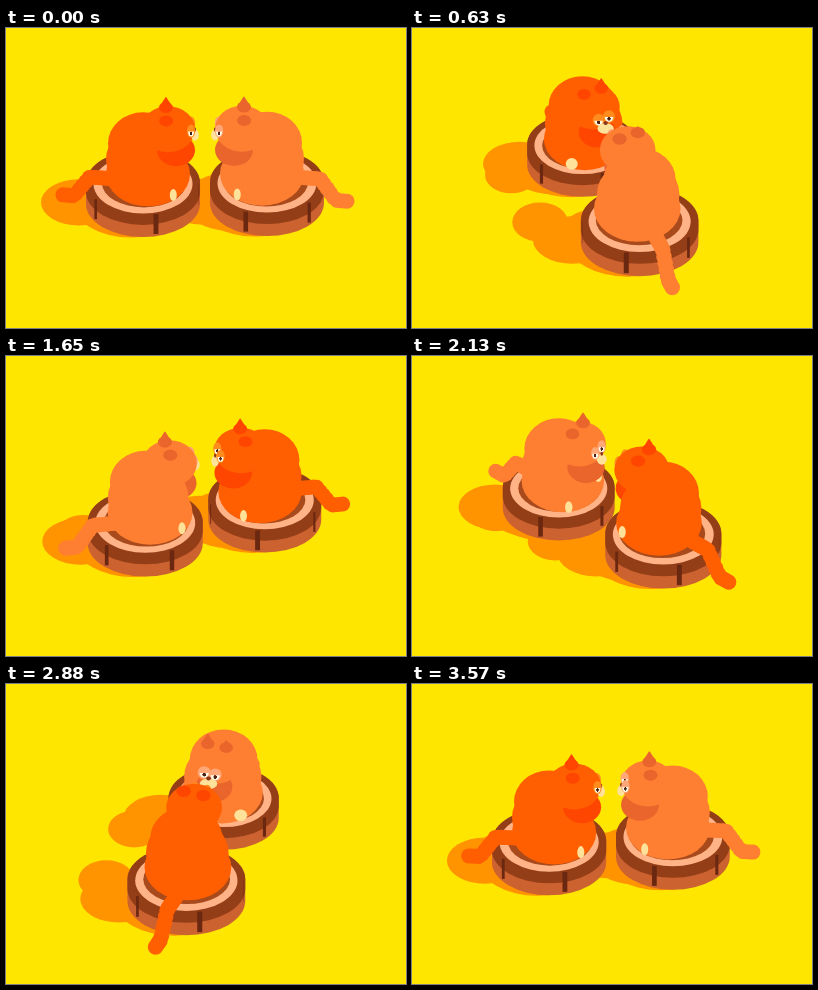
An HTML page without scripts that plays this animation: 400 px wide and 300 px high, repeating every 3.6 s.

```html
<!DOCTYPE html>
<html lang="en">
<head>
<meta charset="utf-8">
<title>Two cats circling on robot vacuums</title>
<style>
@property --turn { syntax: "<angle>"; inherits: true; initial-value: 0deg; }
@keyframes turn { to { --turn: 360deg; } }

html, body { margin: 0; width: 100%; height: 100%; overflow: hidden; background: #ffe600; }
.stage {
  position: relative; width: 400px; height: 300px; overflow: hidden;
  isolation: isolate; background: #ffe600;
  animation: turn 3.6s steps(120) infinite;
}

/* a is the direction the cat faces; c and n are its cosine and sine */
.spot { --c: cos(var(--a)); --n: sin(var(--a)); --k: .67; }
.orange { --a: calc(var(--turn) - .5deg); --fur: #ff5f00; --dark: #ff4600; --lid: #ff8c1c; }
.tan { --a: calc(var(--turn) + 179.5deg); --fur: #ff7f32; --dark: #e9652c; --lid: #ffa777; }

.cat, .shade {
  position: absolute; left: 199.3px; top: 158.5px; width: 0; height: 0;
  translate: calc(var(--c) * -62px) calc(var(--n) * -43px);
  scale: calc(1 - .035 * var(--n));
}
.shade { z-index: -1000; }
.cat { z-index: calc(-100 * var(--n)); }

/* f: forward, s: sideways, u: up, x: screen shift, d: nearness to the viewer */
.part {
  --f: 0; --s: 0; --u: 0; --x: 0;
  --d: (var(--f) * var(--n) - var(--s) * var(--c));
  position: absolute; width: calc(var(--w) * 1px); height: calc(var(--h) * 1px);
  border-radius: 50%; background: var(--fur);
  translate:
    calc(-50% + 1px * (var(--f) * var(--c) + var(--s) * var(--n) + var(--x)))
    calc(-50% + 1px * (var(--k) * var(--d) - var(--u)));
}
.l { --side: 1; }
.r { --side: -1; }

.shade .part { --u: -15; background: #ff9400; }
.shade .base { --w: 114; --h: 66; --x: -12; --u: -17; }
.shade .low { --w: 90; --h: 58; --f: 5; --x: -33; }
.shade .mid { --w: 76; --h: 46; --f: 1; --x: -65; }
.shade .top { --w: 54; --h: 38; --f: 25; --x: -85; --u: -12; }

.side { --w: 114; --h: 87; --u: -6; z-index: -900; border-radius: 57px / 33px; background: #cc6230; }
.band { --w: 114; --h: 75; z-index: -890; border-radius: 57px / 33px; background: #943e17; }
.plate { --w: 99; --h: 59; --u: 3.5; z-index: -880; background: #ffb386; }
.seat { --w: 84; --h: 48; --f: 1; --u: 4; z-index: -870; background: #a84a1c; }
.notch {
  position: absolute; width: 5px; height: 20px; z-index: -860; background: #6b2810;
  --p: calc(var(--a) + 5deg + 72deg * var(--i));
  translate:
    calc(-50% + 55.5px * cos(var(--p)))
    calc(-50% + 4.5px + 33px * sin(var(--p)));
  scale: max(0, sin(var(--p))) 1;
}

.tail i {
  --p: calc(var(--i) / 14);
  --w: 15; --h: 15; z-index: -1;
  --f: calc(-34 - 46 * var(--p));
  --s: calc(6 * var(--p));
  --u: clamp(-11, 9 - 60 * (var(--p) - .42), 9);
}

.low { --w: 84; --h: 64; --f: 5; --u: 13; z-index: 0; }
.trunk { --w: 80; --h: 70; --f: 3; --u: 28; z-index: 0; }
.mid { --w: 70; --h: 62; --f: 0; --u: 44; z-index: 0; }
.chin { --w: 38; --h: 32; --f: 33; --u: 37; z-index: calc(8 + var(--d)); background: var(--dark); }
.top { --w: 54; --h: 46; --f: 25; --u: 58; z-index: 60; }
.foot {
  --w: 14; --h: 12; --f: 30; --s: calc(28 * var(--side)); --u: 11;
  z-index: calc(8 + var(--d)); background: #ffe29a; scale: max(.5, var(--n)) 1;
}

.ear { --w: 14; --h: 11; --f: 23; --s: calc(10 * var(--side)); --u: 73; z-index: 80; background: var(--dark); }
.ear::before {
  content: ""; position: absolute; left: 0; bottom: 50%; width: 14px; height: 11px;
  background: var(--dark); clip-path: polygon(50% 0, 100% 100%, 0 100%);
  transform-origin: bottom;
  scale: 1 clamp(0, .6 + var(--side) * var(--c) + .5 * var(--n), 1);
}

.eye { z-index: calc(90 + 8 * var(--d)); scale: max(.6, var(--n)) 1; }
.eye { --w: 14; --h: 13; --f: 48; --s: calc(6 * var(--side)); --u: 60; background: var(--lid); }
.eye::before {
  content: ""; position: absolute; left: 2px; top: 7px; width: 10px; height: 5px;
  border-radius: 0 0 5px 5px; background: radial-gradient(circle at 50% 35%, #4a2014 1.7px, #fffbe8 2.1px);
}
.muzzle {
  --w: 19; --h: 11; --f: 52; --u: 52; background: #ffe29a;
  z-index: calc(90 + 8 * var(--d)); scale: max(.4, var(--n)) 1;
}
.muzzle::before {
  content: ""; position: absolute; left: 7px; top: -2px; width: 5px; height: 4px;
  border-radius: 40% 40% 50% 50%; background: #8a3517;
}
</style>
</head>
<body>
<div class="stage">
  <div class="spot orange">
    <div class="shade">
      <div class="part base"></div><div class="part low"></div>
      <div class="part mid"></div><div class="part top"></div>
    </div>
    <div class="cat">
      <div class="part side"></div><div class="part band"></div>
      <div class="part plate"></div><div class="part seat"></div>
      <i class="notch" style="--i:0"></i><i class="notch" style="--i:1"></i><i class="notch" style="--i:2"></i>
      <i class="notch" style="--i:3"></i><i class="notch" style="--i:4"></i>
      <div class="tail">
        <i class="part" style="--i:0"></i><i class="part" style="--i:1"></i><i class="part" style="--i:2"></i>
        <i class="part" style="--i:3"></i><i class="part" style="--i:4"></i><i class="part" style="--i:5"></i>
        <i class="part" style="--i:6"></i><i class="part" style="--i:7"></i><i class="part" style="--i:8"></i>
        <i class="part" style="--i:9"></i><i class="part" style="--i:10"></i><i class="part" style="--i:11"></i>
        <i class="part" style="--i:12"></i><i class="part" style="--i:13"></i><i class="part" style="--i:14"></i>
      </div>
      <div class="part low"></div><div class="part trunk"></div><div class="part mid"></div>
      <div class="part chin"></div><div class="part top"></div>
      <div class="part foot l"></div><div class="part foot r"></div>
      <div class="part ear l"></div><div class="part ear r"></div>
      <div class="part eye l"></div><div class="part eye r"></div>
      <div class="part muzzle"></div>
    </div>
  </div>
  <div class="spot tan">
    <div class="shade">
      <div class="part base"></div><div class="part low"></div>
      <div class="part mid"></div><div class="part top"></div>
    </div>
    <div class="cat">
      <div class="part side"></div><div class="part band"></div>
      <div class="part plate"></div><div class="part seat"></div>
      <i class="notch" style="--i:0"></i><i class="notch" style="--i:1"></i><i class="notch" style="--i:2"></i>
      <i class="notch" style="--i:3"></i><i class="notch" style="--i:4"></i>
      <div class="tail">
        <i class="part" style="--i:0"></i><i class="part" style="--i:1"></i><i class="part" style="--i:2"></i>
        <i class="part" style="--i:3"></i><i class="part" style="--i:4"></i><i class="part" style="--i:5"></i>
        <i class="part" style="--i:6"></i><i class="part" style="--i:7"></i><i class="part" style="--i:8"></i>
        <i class="part" style="--i:9"></i><i class="part" style="--i:10"></i><i class="part" style="--i:11"></i>
        <i class="part" style="--i:12"></i><i class="part" style="--i:13"></i><i class="part" style="--i:14"></i>
      </div>
      <div class="part low"></div><div class="part trunk"></div><div class="part mid"></div>
      <div class="part chin"></div><div class="part top"></div>
      <div class="part foot l"></div><div class="part foot r"></div>
      <div class="part ear l"></div><div class="part ear r"></div>
      <div class="part eye l"></div><div class="part eye r"></div>
      <div class="part muzzle"></div>
    </div>
  </div>
</div>
</body>
</html>
```
